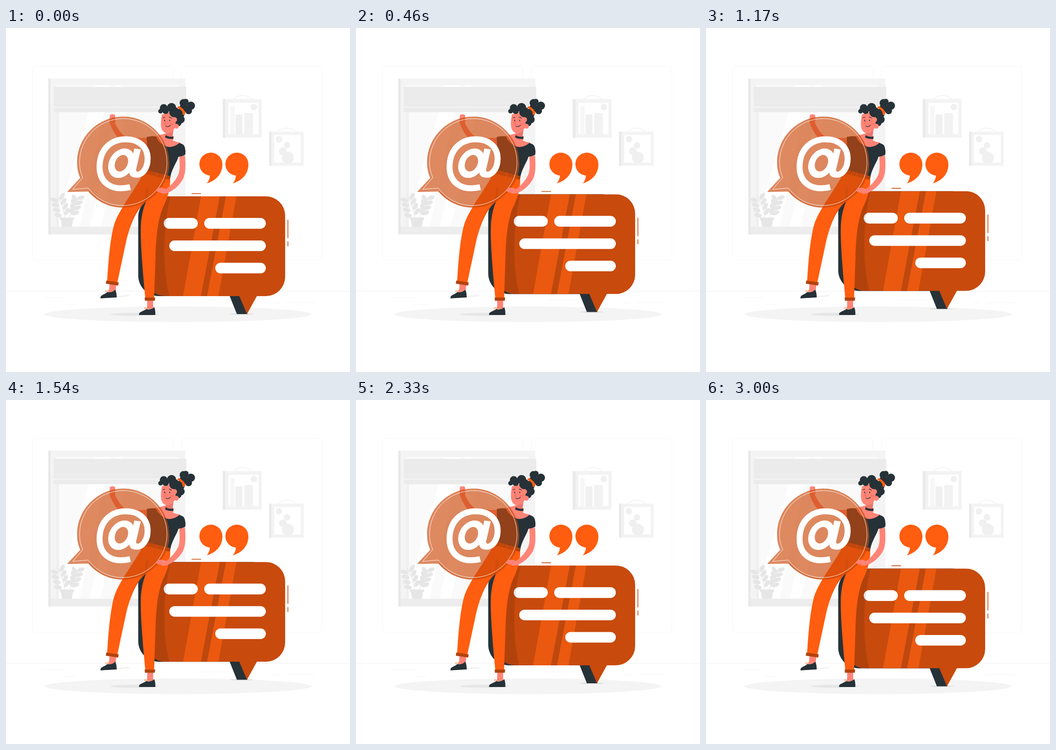
An HTML page with a canvas for the animation above (3.04 s loop, 748 by 748 pixels).

```html
<!DOCTYPE html>
<html lang="en">
<head>
<meta charset="utf-8">
<title>Message bubbles</title>
<style>
html, body { margin: 0; width: 100%; height: 100%; overflow: hidden; background: #fff; }
canvas { display: block; width: 748px; height: 748px; }
</style>
</head>
<body>
<canvas id="stage" width="748" height="748"></canvas>
<script>
const ctx = document.getElementById('stage').getContext('2d');
const LOOP = 3040, STEP = 1000 / 24, RISE = 14.8;
const ORANGE = '#ff5d0f', FACE = '#c84a0d', DEEP = '#b2430d', DARK = '#263238', SKIN = '#ff8476';

function fill(d, color) {
  ctx.fillStyle = color;
  ctx.fill(new Path2D(d));
}
function line(d, color, width = 1) {
  ctx.strokeStyle = color;
  ctx.lineWidth = width;
  ctx.stroke(new Path2D(d));
}
function rect(x, y, x2, y2, color) {
  ctx.fillStyle = color;
  ctx.fillRect(x, y, x2 - x, y2 - y);
}
function rounded(x, y, x2, y2, r, color) {
  ctx.beginPath();
  ctx.roundRect(x, y, x2 - x, y2 - y, r);
  ctx.fillStyle = color;
  ctx.fill();
}
function oval(x, y, rx, ry, color, turn = 0) {
  ctx.beginPath();
  ctx.ellipse(x, y, rx, ry, turn, 0, 7);
  ctx.fillStyle = color;
  ctx.fill();
}
function dot(x, y, r, color) { oval(x, y, r, r, color); }

function drawWindow() {
  rect(92, 110, 390, 449, '#f4f4f4');
  rect(92, 110, 97, 449, '#e8e8e8');
  rect(109, 124, 376, 432, '#fafafa');
  fill('M180 183H214L160 432H113V410Z M238 183H262L206 432H182Z', '#fff');
  fill('M194 124H228L226 128H192Z M238 124H252L250 128H236Z', '#fff');
  rect(109, 183, 115, 432, '#f0f0f0');
  rect(362, 183, 376, 432, '#f4f4f4');
  rect(97, 432, 390, 449, '#ededed');
  rect(104, 128, 392, 162, '#ebebeb');
  rect(104, 162, 392, 183, '#f0f0f0');
  rect(104, 163, 392, 171, '#ebebeb');
  rect(104, 174, 392, 183, '#ebebeb');
  rect(104, 171, 392, 172, '#fafafa');
}

function leaf(x, y, turn) { oval(x, y, 8.5, 4.6, '#e6e6e6', turn); }
function drawPlant() {
  line('M127 413C127 396 118 376 111 365 M138 413C141 394 151 380 160 368', '#e6e6e6', 1.3);
  for (let i = 0; i < 4; i++) {
    leaf(105 + i * 2.7, 374 + i * 11, .25);
    leaf(122 + i * 3.5, 366 + i * 11, -1);
    leaf(149 - i * 2, 370 + i * 10, 1);
    leaf(163 - i * 4, 369 + i * 11, -.3);
  }
  rect(117, 412, 148, 417, '#e6e6e6');
  fill('M119 417H146L143 432H122Z', '#e6e6e6');
}

function drawPicture(x, y, x2, y2, edge) {
  const mid = (x + x2) / 2 + 1;
  line(`M${mid - 20} ${y}Q${mid} ${y - 16} ${mid + 20} ${y}`, '#e9e9e9');
  rect(x, y, x2, y2, '#f3f3f3');
  rect(x, y, x + 5, y2, '#e9e9e9');
  rect(x + 5 + edge, y + edge + 1, x2 - edge, y2 - edge - 1, '#fff');
}

function drawRoom() {
  ctx.strokeStyle = '#f6f6f6';
  ctx.lineWidth = 1;
  for (const x of [57.5, 381.5]) {
    ctx.beginPath();
    ctx.roundRect(x, 83, 305.5, 422, 7);
    ctx.stroke();
  }
  drawWindow();
  drawPlant();

  drawPicture(471.5, 154.5, 556, 238.5, 7);
  rect(488, 170, 497, 232, '#f7f7f7');
  rect(499, 188, 514, 232, '#f0f0f0');
  rect(518, 185, 537, 232, '#f2f2f2');
  dot(539, 172, 7, '#f0f0f0');

  drawPicture(572, 225.5, 647, 299.5, 6);
  dot(593.5, 242, 7, '#f0f0f0');
  dot(611, 255, 7, '#f0f0f0');
  dot(602, 268, 8.5, '#f0f0f0');
  dot(613, 282, 13, '#f0f0f0');

  line('M0 572.5H748', '#f0f0f0');
  line('M80 586.5H127 M127 601.5H153 M416 591.5H490 M582 597.5H595 M609 597.5H672', '#f5f5f5');
  oval(374, 622.5, 290, 17, '#f4f4f4');
}

function drawQuotes() {
  for (const x of [445.5, 502]) {
    dot(x, 296, 25, ORANGE);
    fill(`M${x + 25} 296C${x + 25} 319 ${x + 10} 332 ${x - 9} 338Q${x - 2} 330 ${x - 2} 319Z`, ORANGE);
  }
}

function drawPanel(dy) {
  ctx.save();
  ctx.translate(0, dy);
  oval(512.5, 622, 26, 1.4, '#dcdcdc');
  rounded(287.5, 366, 580, 583, 45, DARK);
  fill('M486 582H510L525 622H502Z', DARK);
  fill('M507 582H546L524 622Z', FACE);

  ctx.save();
  ctx.beginPath();
  ctx.roundRect(304, 366, 303, 217, 42);
  ctx.clip();
  rect(300, 366, 610, 583, FACE);
  fill('M424 366H465L424 583H385Z M478 366H501L462 583H437Z', '#ea590f');
  fill('M465 366H478L437 583H424Z', '#be480e');
  rounded(343, 413, 417, 436.5, 12, '#fff');
  rounded(431, 413, 565, 436.5, 12, '#fff');
  rounded(355, 462, 565, 485, 12, '#fff');
  rounded(455, 510.5, 565, 533.5, 12, '#fff');
  fill('M300 366H358C344 420 337 510 355 583H300Z', 'rgba(0,0,0,.11)');
  ctx.restore();

  line('M403.5 360H424 M613 417V457 M613 464V474.5', FACE, 1.6);
  ctx.restore();
}

function drawShoe(x, y) {
  ctx.save();
  ctx.translate(x, y);
  fill('M0 11C0 6 7 6 16 0Q25 3 33-4Q36 4 35 13H1Q-1 13 0 11Z', DARK);
  line('M14 1C9-3 13-5 17 0C17-6 23-5 18 0', ORANGE, .9);
  line('M0 12H35', '#1b252a', 1);
  ctx.restore();
}

function drawLegs() {
  oval(280, 622.5, 53, 3.2, '#e6e6e6');
  line('M240 584Q252 583 268 582', '#ececec', 2);
  fill('M225 556L240 558L238 574Q231 578 224 574Z', SKIN);
  fill('M307 590H320V609Q313 615 307 609Z', SKIN);
  ctx.save();
  ctx.translate(204, 576);
  ctx.rotate(-.06);
  ctx.translate(-204, -576);
  drawShoe(205, 575);
  ctx.restore();
  drawShoe(289.5, 611);
  fill('M301 312L357 325C358 350 351 370 341 391C329 420 326 460 325 500L322 588H303C298 535 293 480 293 440C293 412 298 393 305 376C282 395 267 435 260 470L242 554L220 551C222 515 226 460 235 428C246 393 282 350 301 312Z', ORANGE);
  fill('M305 344L302 374C288 390 275 412 269 436C278 408 290 389 306 376L310 350Z', '#dd500d');
  fill('M218 549L245 553L244 560L217 556Z', DEEP);
  fill('M301.5 586H324.5L323.5 593H302Z', DEEP);
}

function drawTorso() {
  fill('M226 189Q232 186 237 189L238 199L237 207C243 218 250 232 262 237C280 240 296 239 312 239L314 259C292 254 270 251 252 245C240 239 228 216 225 204Z', SKIN);
  fill('M228 190L231 205M238 193L235 203', '#d96862');
  fill('M321 236L352 228L365 236L363 245Q370 248 379 249L372 264L345 270L326 257Z', SKIN);
  fill('M306 237Q317 234 326 236Q333 252 350 258Q364 261 377 250Q387 252 389 260Q391 268 390 275Q383 280 375 280L372 288C366 300 359 312 357 327L306 317Q308 276 306 237Z', DARK);
  fill('M307 309L357 322L356 330L304 317Z', DEEP);
  line('M328 315V322 M344 319V326', ORANGE, 1.2);
}

function drawHead() {
  fill('M349 219L365 214L362 238Q354 241 347 235Z', '#e9756c');
  fill('M347 233Q355 238 364 236V241Q354 242 346 238Z', DARK);
  for (const [x, y, r] of [[386, 163, 8.5], [402, 169, 9], [397, 180, 7.5], [386, 174, 9], [391, 160, 6]])
    dot(x, y, r, DARK);
  fill('M339 188C337 199 336 210 338 218Q341 228 351 229Q361 229 367 217L374 198L365 180Z', SKIN);
  for (const [x, y, r] of [[336, 181, 5], [343, 174, 8.5], [347, 180, 7], [360, 173, 10], [366, 183, 11], [377, 187, 11], [380, 199, 8.5], [375, 207, 6.5]])
    dot(x, y, r, DARK);
  dot(370.5, 213.5, 5.3, SKIN);
  fill('M372 173Q375 168 380 172Q390 179 390 186Q388 191 384 188Q385 179 372 173Z', ORANGE);
  oval(345, 201, 1.1, 1.8, DARK);
  oval(356, 201, 1.1, 1.8, DARK);
  line('M341 196Q343 193 346 195 M354 194Q358 193 360 197', DARK, 1.2);
  line('M348 202Q344 207 346 209H349', '#d85d57', 1);
  line('M347 213Q352 217 358 211', DARK, 1.1);
  oval(361, 208, 3.6, 2.6, '#ff7468');
}

function drawBubble() {
  const body = 'M179 355C200 379 226 390 255 390C309 390 354 346 354 292C354 238 309 193 255 193C200 193 155 238 155 292C155 304 157 315 162 326L134 356Z';
  ctx.globalAlpha = .65;
  fill(body, '#cc4a0c');
  ctx.globalAlpha = .4;
  line(body, FACE, 1.4);
  line('M181 355C226 407 305 397 340 343C350 329 355 311 354 291', FACE, 2);
  ctx.globalAlpha = 1;
  line('M179 348C198 373 224 386 254 386C306 386 350 344 350 292C350 239 307 197 255 197C203 197 160 239 160 292C160 304 162 314 167 325L145 351Z', '#fff', .9);
}

function drawAt() {
  ctx.lineCap = 'butt';
  ctx.lineJoin = 'round';
  line('M270 346C228 356 203 335 203.5 301C204 264 228 242 260 242C291 242 308 260 308 284C308 306 296 319 285 319C276 319 273 314 276 302', '#fff', 13);
  ctx.save();
  ctx.translate(253, 294);
  ctx.transform(1, 0, -.22, 1, 0, 0);
  ctx.beginPath();
  ctx.ellipse(-2, 0, 21, 25, 0, 0, 7);
  ctx.strokeStyle = '#fff';
  ctx.lineWidth = 14;
  ctx.stroke();
  ctx.restore();
  fill('M279 262L293 264L284 303Q281 312 286 313L284 325Q268 326 268 312Z', '#fff');
}

function drawHand() {
  fill('M377 279Q384 280 389 276C391 296 391 315 385 328C377 343 364 353 351 359Q343 362 335 358L327 355Q326 349 332 348Q340 346 348 350C359 343 372 328 376 315C379 302 377 290 377 279Z', SKIN);
  line('M329 352L338 353 M331 356L340 356', '#e9756c', .8);
}

function draw(time) {
  const step = Math.floor((time % LOOP + 4) / STEP);
  const phase = (step * STEP + 40) % LOOP / LOOP;
  const lift = RISE * (1 - Math.abs(2 * phase - 1));
  ctx.clearRect(0, 0, 748, 748);
  drawRoom();
  drawQuotes();
  drawPanel(.4 - lift);
  drawLegs();
  drawTorso();
  drawHead();
  drawBubble();
  drawAt();
  drawHand();
}

const start = performance.now();
function tick() {
  draw(performance.now() - start);
  requestAnimationFrame(tick);
}
tick();
</script>
</body>
</html>
```
